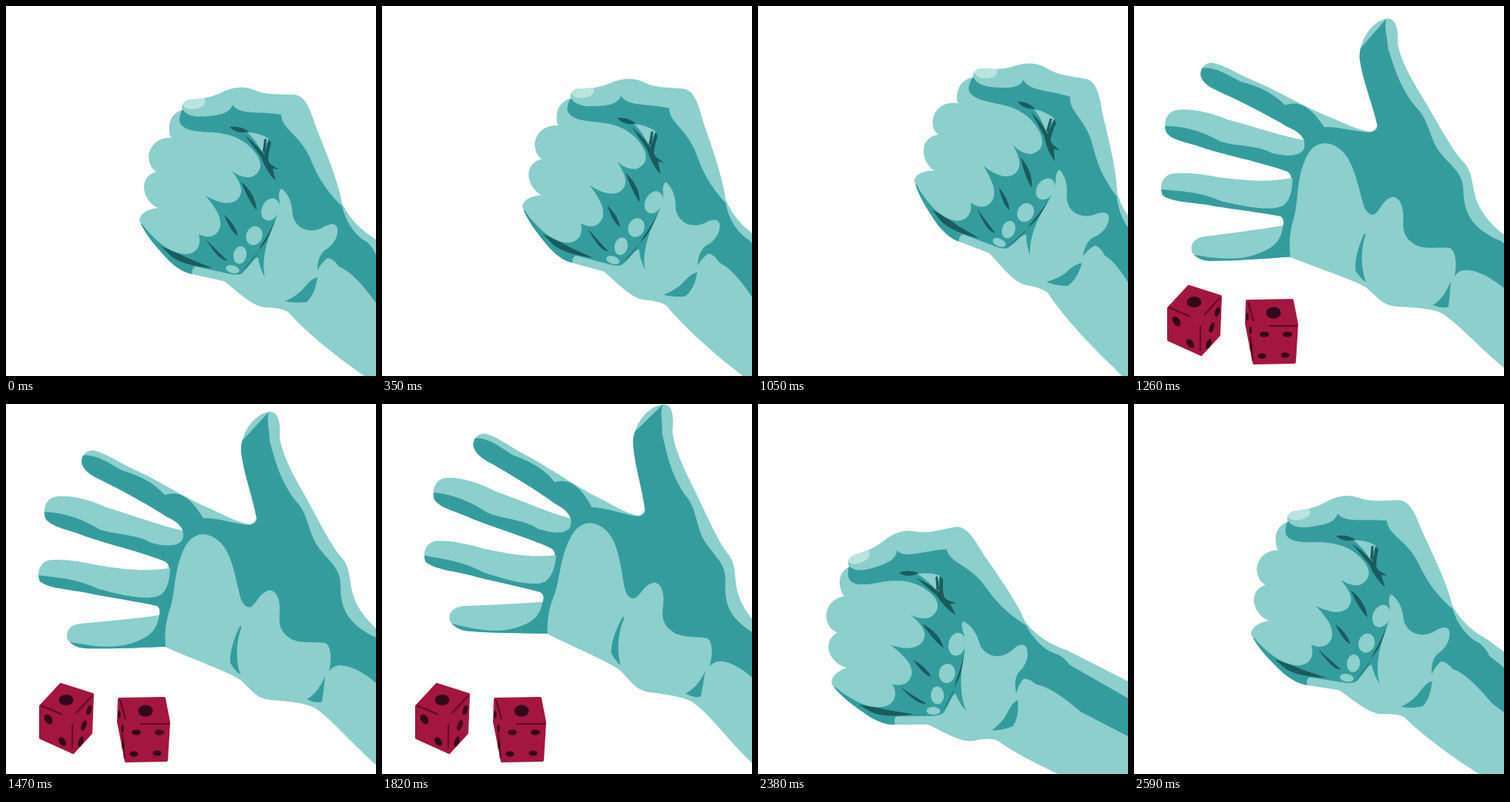
An HTML page that plays this animation: 480x480 px, repeating every 2.66 s.

```html
<!DOCTYPE html>
<html>
<head>
<meta charset="utf-8">
<style>
html, body { margin: 0; width: 100%; height: 100%; overflow: hidden; background: #fff }
svg { display: block; width: 100%; height: 100% }
.light { fill: #8ccfcc }
.dark { fill: #359c9e }
.deep { fill: #1a5c5e }
.nail { fill: #bbe3e0 }
.die { fill: #a3163f; stroke: #a3163f; stroke-width: 4; stroke-linejoin: round }
.edge { fill: none; stroke: #5e0a24; stroke-width: 2 }
.pip { fill: #34071a }
</style>
</head>
<body>
<svg viewBox="0 0 480 480">
  <defs>
    <path id="fistShape" d="M640 436L480 303C462 291 448 280 436 256C432 232 418 196 404 162C396 140 390 114 372 115C352 114 338 116 322 109C306 102 290 107 280 112C262 121 248 120 236 122C229 125 227 130 229 135C216 138 210 150 212 163Q212 168 215 171C196 170 186 182 185 196Q186 210 195 215C182 219 179 228 179 236C180 248 188 258 197 262C180 264 174 271 173 278C180 296 196 314 212 331Q228 346 242 348L283 357C300 370 320 390 336 391Q356 391 366 397C388 422 430 456 465 480L640 620Z"/>
    <path id="palmShape" d="M640 411L480 291C464 276 450 258 447 232C444 208 440 204 430 193C414 170 400 140 380 105C364 76 358 60 355 44C357 22 352 10 343 10C322 12 304 38 305 62C308 90 320 120 325 148Q322 155 316 156C300 154 280 142 256 132C226 118 196 98 160 82C140 72 126 62 112 60Q98 62 98 76Q101 88 118 96C150 112 180 128 208 146Q226 154 229 164C200 158 170 146 130 134C108 124 84 118 66 120C50 122 48 138 51 148C58 160 80 162 104 172C140 184 176 192 206 204Q212 208 211 213C180 218 150 214 118 209C96 204 70 200 54 203C42 208 40 220 44 230C56 240 84 240 110 246C140 252 170 256 196 262Q201 266 199 274C170 278 130 282 96 285C80 287 77 298 80 306Q88 316 102 317C140 318 175 316 206 315C240 330 290 348 304 358C320 372 324 382 344 384C370 386 388 388 400 394C420 406 448 440 480 468L640 600Z"/>
    <clipPath id="fistClip"><use href="#fistShape"/></clipPath>
    <clipPath id="palmClip"><use href="#palmShape"/></clipPath>
  </defs>

  <g id="fist">
    <use href="#fistShape" class="light"/>
    <g clip-path="url(#fistClip)">
      <path class="dark" d="M229 134Q236 146 262 143C282 141 290 138 294 128C302 142 330 136 357 141C358 160 380 166 394 196C404 220 412 236 436 260C442 284 456 300 468 306Q476 313 480 323L640 470V520L480 385C460 358 446 344 432 338Q424 327 417 327Q409 333 404 343C404 326 410 318 418 314C428 306 431 296 430 288C427 280 418 283 410 288C392 296 376 288 372 272C371 256 368 246 358 237Q354 237 354 248C358 266 344 288 339 306C334 324 333 340 336 352Q329 340 327 326C320 328 318 336 306 347Q300 350 288 347L246 338Q240 340 242 350L200 345L173 285L240 240L235 165Q224 158 225 147Q226 138 229 134Z"/>
      <path class="deep" d="M201 312Q222 320 238 328L268 340Q232 337 216 326ZM302 348Q326 326 330 312Q342 294 349 278Q340 304 332 312Q318 332 302 348Z"/>
      <path class="light" d="M215 150Q222 140 225 150C230 166 262 162 278 165C300 168 314 178 323 190C334 204 332 216 318 222Q306 224 293 214C302 226 306 234 305 242C302 256 286 262 259 246C272 262 280 274 278 286C274 300 262 302 250 296C254 310 248 322 232 322C214 320 200 310 182 290L173 278L215 250L205 200Z"/>
    </g>
    <path class="deep" d="M305 228Q324 244 325 265Q315 254 305 228ZM283 271Q298 284 301 298Q292 294 283 271ZM259 302Q270 314 287 330Q277 332 259 302ZM290 157Q304 155 315 163Q300 167 290 157ZM310 168Q332 184 343 205L354 212L346 211L350 227Q338 216 331 196Z"/>
    <path class="light" d="M313 164Q328 164 341 172L332 189Q324 174 313 164Z"/>
    <path class="deep" d="M335 173L338 172L336 191L333 188ZM341 173L344 178Q340 190 340 204L335 194Z"/>
    <g class="light">
      <ellipse cx="343" cy="264" rx="11" ry="15" transform="rotate(25 343 264)"/>
      <ellipse cx="322" cy="298" rx="10.500" ry="12.500" transform="rotate(20 322 298)"/>
      <ellipse cx="303.500" cy="323" rx="8.500" ry="11.500" transform="rotate(10 303 323)"/>
      <ellipse cx="294" cy="341.500" rx="9" ry="5" transform="rotate(15 294 341)"/>
    </g>
    <path class="dark" d="M362 383Q380 375 388 364Q397 353 404 352Q401 374 390 384Q374 386 362 383Z"/>
    <path class="nail" d="M229 128Q233 120 258 120Q261 130 247 133Q234 136 229 128Z"/>
  </g>

  <g id="palm">
    <use href="#palmShape" class="light"/>
    <path class="dark" clip-path="url(#palmClip)" d="M343 8C336 16 342 32 342 48C350 76 356 100 376 126C392 142 392 166 404 184C420 206 434 212 434 236C434 262 440 284 480 303L640 420V500L480 362C462 346 440 336 428 340Q422 342 419 347C424 326 420 312 414 310C398 308 378 312 366 302C350 290 356 276 355 262C354 246 346 240 340 242C328 246 326 258 318 263Q311 266 305 254C298 230 294 190 274 176C256 162 238 170 230 190C218 216 220 240 214 262C206 284 206 300 207 315L200 330H80V308C120 316 150 320 182 302Q198 292 199 270L180 262L30 250V222H42C70 226 90 226 120 240C150 248 184 256 200 248Q212 240 213 213L180 206L40 180V140H52C80 142 100 150 120 162C140 170 168 168 188 180C210 186 224 184 229 176Q231 170 229 163L100 110L96 68C110 62 130 74 150 86C170 92 190 100 206 118C226 112 240 122 256 148C276 148 300 156 316 157Q326 155 325 148L295 60Z"/>
    <path class="dark" d="M303 289Q306 286 305 291C298 310 298 334 304 351Q297 346 291 336C290 322 295 306 303 289ZM390 383Q404 376 414 353Q412 372 410 386Q402 389 390 383Z"/>
  </g>

  <g id="dice">
    <path class="die" d="M71 364L112 377L110 427L87 452L45 433V392ZM147 383L205 382L211 413L208 462L156 463L146 412Z"/>
    <path class="edge" d="M45 391L73 403M86 415V447M91 401L111 379M148 384L155 409M175 415H212M151 428L154 460"/>
  </g>
</svg>
<script>
const FRAME = 70, COUNT = 38;
const $ = id => document.getElementById(id);
const fist = $('fist'), palm = $('palm'), dice = $('dice');

// x, y, rx, ry, tilt
const pips = [
  [78, 384, 9.5, 7, 0], [55, 409, 4.5, 7, -35], [73, 438, 4, 6.5, -35],
  [108, 397, 3, 6.5, 20], [101, 417, 3, 7, 20], [97, 438, 3, 7, 20],
  [181, 398, 9.5, 7.5, 0], [169, 426, 6, 3.6, 0], [199, 426, 6, 3.6, 0],
  [166, 454, 5.5, 3.4, 0], [196, 453, 5.5, 3.4, 0],
  [147, 403, 1.6, 5, 0], [151, 421, 1.6, 5, 0], [152, 443, 1.6, 5, 0]
];
for (const [x, y, rx, ry, tilt] of pips) {
  const pip = document.createElementNS('http://www.w3.org/2000/svg', 'ellipse');
  const attrs = { cx: x, cy: y, rx, ry, class: 'pip', transform: `rotate(${tilt} ${x} ${y})` };
  for (const key in attrs) pip.setAttribute(key, attrs[key]);
  dice.append(pip);
}

function pose(node, angle, dx = 0, dy = 0) {
  node.setAttribute('transform', `translate(${dx} ${dy}) rotate(${angle} 537 452)`);
}

function draw(step) {
  const open = step >= 17 && step < 32;
  fist.style.display = open ? 'none' : '';
  palm.style.display = dice.style.display = open ? '' : 'none';
  if (step < 17) {
    // shake: three steps up, three down
    pose(fist, 8.5 * (1 - Math.abs(step % 6 - 3) / 3));
  } else if (open) {
    // slow lift, then a quick drop
    const drop = Math.max(0, step - 27);
    pose(palm, 0.6 * (Math.min(step, 27) - 21) - 3.95 * drop, 2.25 * drop, -2.25 * drop);
  } else {
    const left = COUNT - step;
    pose(fist, -3.2 * left, -12 * left);
  }
}

const start = performance.now();
function tick() {
  draw(Math.floor((performance.now() - start) / FRAME) % COUNT);
  requestAnimationFrame(tick);
}
tick();
</script>
</body>
</html>
```
